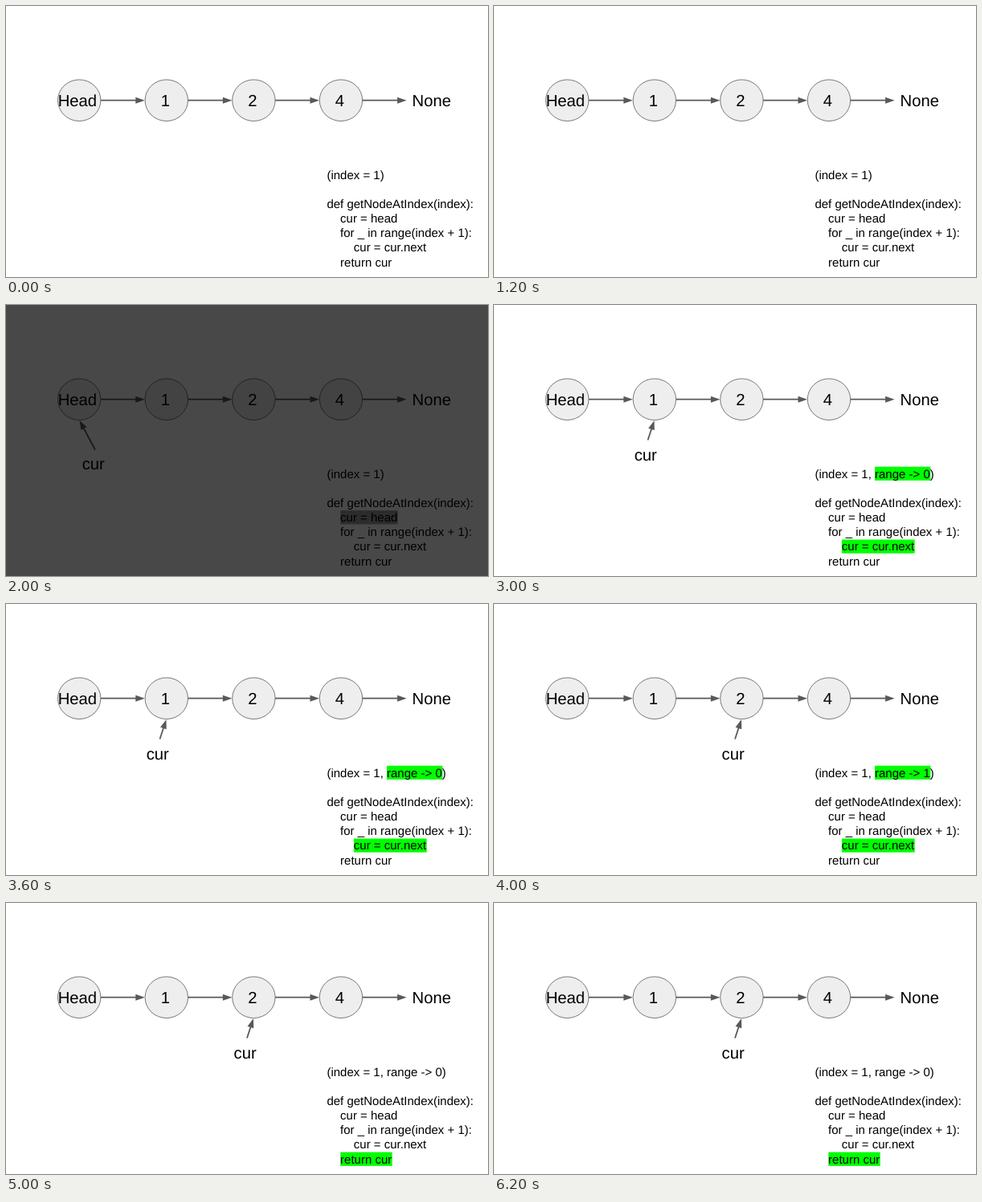
These frames come from a looping animation (600 by 338 pixels, 7 s). An HTML page:

```html
<!DOCTYPE html>
<html lang="en">
<head>
<meta charset="utf-8">
<title>Linked list lookup</title>
<style>
  html, body { margin: 0; width: 100%; height: 100%; overflow: hidden; background: #fff; }
  svg { display: block; width: 600px; height: 338px; }
  text { font: 15px "Liberation Sans", Arial, sans-serif; text-rendering: geometricPrecision; }
  .label { font-size: 20.3px; }
  ellipse { fill: #eee; stroke: #595959; stroke-width: .8; }
  .shaft { stroke: #595959; stroke-width: 1.8; }
  .tip { fill: #595959; }
</style>
</head>
<body>
<svg id="stage" viewBox="0 0 600 338"></svg>
<script>
const stage = document.getElementById('stage');
const LOOP = 7000, LEFT = 399.4, INDENT = 16.7, BASE = 215.5, PITCH = 18.17;
const GREEN = '#0f0', GRAY = '#9c9c9c';

// Code lines: [row, indent level, text]
const code = [
  [2, 0, 'def getNodeAtIndex(index):'],
  [3, 1, 'cur = head'],
  [4, 1, 'for _ in range(index + 1):'],
  [5, 2, 'cur = cur.next'],
  [6, 1, 'return cur']
];

// marks: [row, x, width]; cur: label x and baseline, then arrow start and end
const range = [0, 474, 69.4], next = [5, 432.9, 90.8];
const atTwo = [283.5, 193.5, 300, 168.5, 308, 144];
const steps = [
  { from: 0, note: '(index = 1)', marks: [] },
  { from: 2000, note: '(index = 1)', marks: [[3, 416.3, 71.3]], color: GRAY, dark: true,
    cur: [94.7, 205.3, 111, 180.5, 91.5, 144] },
  { from: 3000, note: '(index = 1, range -> 0)', marks: [range, next], color: GREEN,
    cur: [174.7, 193.5, 191.5, 168.5, 199.5, 144] },
  { from: 4000, note: '(index = 1, range -> 1)', marks: [range, next], color: GREEN, cur: atTwo },
  { from: 5000, note: '(index = 1, range -> 0)', marks: [[6, 416.3, 64.4]], color: GREEN, cur: atTwo }
];

const text = (x, y, s, attrs = '') =>
  `<text x="${x}" y="${y}" ${attrs}>${s.replace('>', '&gt;')}</text>`;
const label = (x, y, s, anchor = 'start') =>
  text(x, y, s, `class="label" text-anchor="${anchor}"`);

function arrow(x1, y1, x2, y2) {
  const length = Math.hypot(x2 - x1, y2 - y1);
  const angle = Math.atan2(y2 - y1, x2 - x1) * 180 / Math.PI;
  return `<g transform="translate(${x2} ${y2}) rotate(${angle})">
    <path class="shaft" d="M${-length} 0H-10"/><path class="tip" d="M0 0L-11.5 -4V4Z"/></g>`;
}

function list() {
  let out = '';
  ['Head', '1', '2', '4'].forEach((name, i) => {
    const x = 91.2 + 108.6 * i;
    out += `<ellipse cx="${x}" cy="117.7" rx="26.7" ry="25.8"/>`
      + arrow(x + 26.7, 117.7, x + 81.6, 117.7)
      + label(x - (i ? 1.5 : 2.3), 125.3, name, 'middle');
  });
  return out + label(505.5, 125.3, 'None');
}

function render(step) {
  const marks = step.marks.map(([row, x, w]) =>
    `<rect x="${x}" y="${BASE + row * PITCH - 13.8}" width="${w}" height="17.2" fill="${step.color}"/>`);
  const lines = code.map(([row, level, s]) =>
    text(LEFT + level * INDENT, BASE + row * PITCH, s));
  let out = list() + marks.join('') + text(LEFT, BASE, step.note) + lines.join('');
  if (step.cur) {
    const [x, y, ...ends] = step.cur;
    out += label(x, y, 'cur') + arrow(...ends);
  }
  if (step.dark) out += '<rect width="600" height="338" opacity=".718"/>';
  stage.innerHTML = out;
}

const start = performance.now();
let shown;
function tick() {
  const t = (performance.now() - start) % LOOP;
  const step = steps.findLast(s => t >= s.from);
  if (step !== shown) render(shown = step);
  requestAnimationFrame(tick);
}
tick();
</script>
</body>
</html>
```
